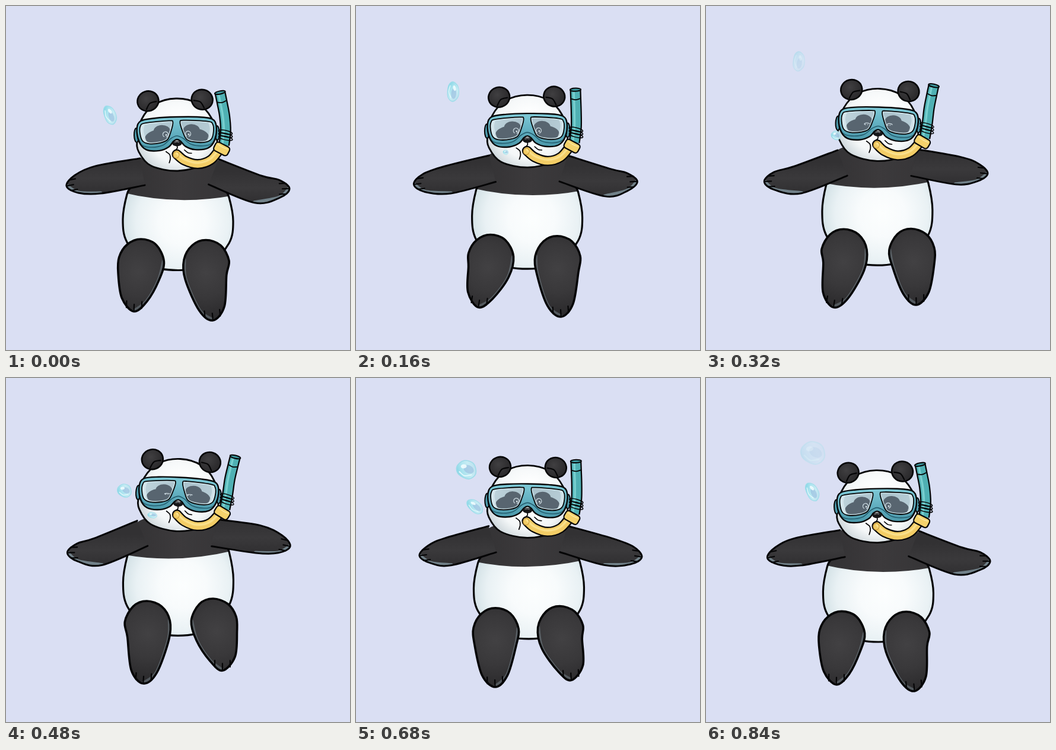
An HTML page with a canvas for the animation above (0.88 s loop, 580 px wide and 580 px high).

```html
<!DOCTYPE html>
<html lang="en">
<head>
<meta charset="utf-8">
<title>Snorkelling panda</title>
<style>
html, body { margin: 0; width: 100%; height: 100%; overflow: hidden; background: #dadff3; }
canvas { display: block; }
</style>
</head>
<body>
<canvas id="stage" width="580" height="580"></canvas>
<script>
const ctx = document.getElementById('stage').getContext('2d');
const LOOP = 880, STEP = 40;
const INK = '#050506';

const mix = (a, b, k) => a + (b - a) * k;
const clamp = (v, low, high) => Math.max(low, Math.min(high, v));

// Every part of the body swings once per loop around its rest value.
let phase = 0;
const swing = (rest, cos, sin = 0) => rest + cos * Math.cos(phase) + sin * Math.sin(phase);

// Smooth curve through [x, y] points.
function spline(pts, closed) {
  const n = pts.length, path = new Path2D();
  const at = i => pts[closed ? (i + n) % n : clamp(i, 0, n - 1)];
  path.moveTo(...pts[0]);
  for (let i = 0; i < (closed ? n : n - 1); i++) {
    const [a, b, c, d] = [at(i - 1), at(i), at(i + 1), at(i + 2)];
    path.bezierCurveTo(
      b[0] + (c[0] - a[0]) / 6, b[1] + (c[1] - a[1]) / 6,
      c[0] - (d[0] - b[0]) / 6, c[1] - (d[1] - b[1]) / 6, c[0], c[1]);
  }
  if (closed) path.closePath();
  return path;
}

const flip = pts => pts.map(([x, y]) => [-x, y]);
const mirrored = half => spline([...half, ...flip(half).reverse().filter(p => p[0])], true);

function oval(x, y, rx, ry, tilt = 0) {
  const path = new Path2D();
  path.ellipse(x, y, rx, ry, tilt, 0, 7);
  return path;
}

function stroke(path, width, color = INK) {
  ctx.lineWidth = width;
  ctx.strokeStyle = color;
  ctx.stroke(path);
}

function fill(path, style) {
  ctx.fillStyle = style;
  ctx.fill(path);
}

function shape(path, style, width) {
  fill(path, style);
  stroke(path, width);
}

function inside(path, draw) {
  ctx.save();
  ctx.clip(path);
  draw();
  ctx.restore();
}

function placed(x, y, angle, draw) {
  ctx.save();
  ctx.translate(x, y);
  ctx.rotate(angle);
  draw();
  ctx.restore();
}

function addStops(gradient, colors) {
  colors.forEach((c, i) => gradient.addColorStop(i / (colors.length - 1), c));
  return gradient;
}
const radial = (x, y, r, ...colors) => addStops(ctx.createRadialGradient(x, y, 0, x, y, r), colors);
const linear = (x0, y0, x1, y1, ...colors) => addStops(ctx.createLinearGradient(x0, y0, x1, y1), colors);

// Unit vector across the line from a to b.
function across(a, b) {
  const dx = b[0] - a[0], dy = b[1] - a[1], d = Math.hypot(dx, dy);
  return [dy / d, -dx / d];
}

// Limb around joints [x, y, half width] ending in a paw; a top point closes the outline.
function drawLimb({ joints, tip, top, side, fur, rim, width }) {
  const edge = sign => joints.map(([x, y, w], i) => {
    const [nx, ny] = across(joints[i - 1] || joints[i], joints[i + 1] || tip);
    return [x + sign * nx * w, y + sign * ny * w];
  });
  const outline = [...edge(1), tip, ...edge(-1).reverse()];
  if (top) outline.push(top);
  const limb = spline(outline, Boolean(top));
  fill(limb, fur);
  inside(limb, () => stroke(spline([...edge(side).slice(1), tip]), 7, rim));
  stroke(limb, width);

  const last = joints[joints.length - 1], [nx, ny] = across(last, tip);
  for (const o of [-0.6, 0, 0.6]) {
    const depth = 1 + 14 * o * o, w = o * last[2];
    const claw = d => [tip[0] + nx * w + ny * d, tip[1] + ny * w - nx * d];
    stroke(spline([claw(depth), claw(depth + 11)]), 2.2);
  }
}

function drawArm(side, shoulder, elbow, tip) {
  const k = 17 / Math.hypot(tip[0] - elbow[0], tip[1] - elbow[1]);
  const wrist = [mix(tip[0], elbow[0], k), mix(tip[1], elbow[1], k), 15];
  drawLimb({
    joints: [[...shoulder, 23], [...elbow, 23.5], wrist], tip, side, width: 3,
    fur: linear(0, elbow[1] - 30, 0, elbow[1] + 25, '#323133', '#3a393b', '#2f2e30'),
    rim: '#718189'
  });
}

function drawLeg(side, topY, hipX, kneeX, ankleX, tip) {
  drawLimb({
    joints: [[hipX, topY + 9, 24], [hipX, topY + 34, 38], [kneeX, topY + 63, 35], [ankleX, tip[1] - 20, 21.5]],
    tip, top: [hipX - 1, topY], side, width: 3.6,
    fur: radial(kneeX, topY + 55, 82, '#424143', '#39383a', '#29282a'),
    rim: 'rgba(120,134,142,0.5)'
  });
}

function drawTorso() {
  const cx = swing(290, 0, -1.5), bottom = swing(440, 5.5, 1);
  const left = swing(308.5, 9, -2.5), right = swing(308, 14.5);
  const flank = [[-78, -0.11], [-86, 0], [-93, 0.33], [-86, 0.63], [-52, 0.92]];
  const place = edge => ([x, k]) => [cx + x, mix(edge, bottom, k)];
  const side = [...flank.map(place(left)), [cx, bottom], ...flip(flank).reverse().map(place(right))];
  const body = spline([...side, [350, left - 62], [230, left - 62]], true);
  fill(body, radial(cx + 8, mix(left, bottom, 0.36), 118, '#fcfefe', '#f8fbfc', '#e9f1f4', '#c6d8de'));
  inside(body, () => {
    const chest = new Path2D();
    chest.moveTo(cx - 93, left - 3);
    chest.quadraticCurveTo(288, (left + right) / 2 + 17, cx + 93, right - 3);
    chest.lineTo(cx + 93, left - 90);
    chest.lineTo(cx - 93, left - 90);
    fill(chest, linear(200, 0, 384, 0, '#323133', '#3c3a3c', '#353436'));
  });
  stroke(spline(side), 3.2);
}

function drawEar(x, y, side) {
  const ear = oval(x, y, 18, 16.8, side * 0.3);
  shape(ear, radial(x - 3, y - 4, 20, '#403f41', '#2b2a2c'), 2.6);
  stroke(spline([[x + side * 3, y + 14], [x - side * 3, y + 4], [x - side * 14, y + 1]]), 2.2);
}

function drawLens(side, open) {
  const half = [[6, -21], [13, -24], [53, -21], [61, -16], [62, -4], [58, 9], [47, 14], [28, 13], [16, 8], [10, -5]];
  const lens = spline(side < 0 ? flip(half) : half, true);
  fill(lens, linear(-60, -20, 60, 15, '#c0d5dd', '#a9c0ca', '#b8ced7'));
  inside(lens, () => {
    fill(oval(side * 32, 2, 22, 11.5, side * 0.15), '#586570');
    fill(oval(side * 25, -7, 14, 10), '#586570');
    stroke(spline([[side * 55, -24], [side * 59, -8], [side * 53, 14]]), 6, 'rgba(236,248,251,0.5)');
    stroke(lens, 5, 'rgba(216,240,246,0.7)');
    const eye = new Path2D();
    eye.ellipse(side * 19, -1, 4.5, 4.5 * open, 0, 2.2, 2.2 + Math.PI * (1 + 0.7 * open));
    stroke(eye, 1.4, '#c4d2d9');
    fill(oval(side * 19 + 1, 0, 1.4, 1.4 * open), '#dbe6ea');
  });
  stroke(lens, 1.8);
}

function drawGoggles(open) {
  for (const side of [-1, 1]) shape(oval(side * 68, -1, 4, 12), '#4c98a9', 2);
  const frame = mirrored([
    [0, -30], [35, -29], [60, -25], [67, -12], [64, 10], [52, 24], [30, 26], [14, 20], [6, 11], [0, 8]
  ]);
  fill(frame, linear(0, -30, 0, 27, '#7fcad7', '#62afc0', '#4a97a9'));
  const rim = [[65, 4], [59, 16], [44, 20], [24, 17], [10, 6]];
  stroke(spline([...flip(rim), [0, 2], ...rim.reverse()]), 1.6, '#255f70');
  stroke(frame, 2.4);
  drawLens(-1, open);
  drawLens(1, open);
}

// Hose with a dark edge and a lighter streak along it.
function drawHose(pts, width, color, shine, dx, dy) {
  const hose = spline(pts);
  stroke(hose, width);
  stroke(hose, width - 4.5, color);
  placed(dx, dy, 0, () => stroke(hose, 3.5, shine));
}

function drawSnorkel(tip) {
  const bend = k => mix(83, tip, k);
  ctx.lineCap = 'butt';
  drawHose([[79, 20], [82.5, -5], [bend(0.2), -30], [bend(0.62), -52], [tip, -70]], 19, '#4fb0b3', '#78cfcf', -3, 0);
  ctx.lineCap = 'round';
  const lean = Math.atan2(tip - bend(0.62), 18);
  shape(oval(tip, -69, 9, 2.6, lean), '#3c969c', 2);
  placed(bend(0.66), -54, lean, () => stroke(spline([[-8, 0], [0, 2], [8, 0]]), 1.8));
  for (const y of [-2, 3, 8]) stroke(oval(82, y, 12, 3, 0.25), 1.4);

  drawHose([[-1, 33], [12, 44], [34, 50.5], [56, 44], [72, 26]], 17, '#f3cd66', '#fae08b', 0, -2);
  stroke(oval(-2, 34, 5, 5.5), 1.2, '#c99b3c');
  placed(75, 26, 0.5, () => {
    const band = new Path2D();
    band.roundRect(-13, -8, 26, 16, 5);
    shape(band, '#f5d26c', 2.2);
    stroke(spline([[-9, -4], [0, -3], [9, -4]]), 1.4, '#fceaa8');
  });
}

function drawHead(t) {
  const open = clamp((Math.abs(t - 410) - 60) / 80, 0.2, 1);
  const tilt = swing(0.6, -2.2, -0.4) * Math.PI / 180;
  placed(swing(289.5, -1.5), swing(207, 10), tilt, () => {
    const skull = mirrored([[0, -61], [36, -52], [59, -27], [67, 6], [65, 27], [45, 51], [0, 61]]);
    shape(skull, radial(4, -8, 82, '#ffffff', '#fdfefe', '#f4f7f8', '#c6d0d5'), 2.8);
    drawEar(-47, -58, -1);
    drawEar(swing(47.3, -3), -58, 1);
    drawGoggles(open);
    fill(oval(0, 15, 8, 4.5), '#161618');
    stroke(spline([[-4, 13], [0, 12], [3, 13]]), 1.5, '#77777a');
    stroke(spline([[0, 19], [0, 23], [-4, 27]]), 1.8);
    stroke(spline([[-19, 28], [-13, 33], [-12, 40], [-14, 47]]), 1.8);
    stroke(spline([[12, 26], [18, 31], [24, 32]]), 1.6);
    drawSnorkel(swing(84, -9.3, 2));
  });
}

// Both bubbles slip out of the mouth, slow down sideways and rise until they fade.
const BUBBLES = [
  {
    born: 140, life: 720, x: age => 172 + 86 * Math.exp(-age / 300), y: age => 250 - 0.177 * age,
    size: age => 4 + 0.024 * age, squash: 0.92, tilt: () => 0.3
  },
  {
    born: 420, life: 820, x: age => 145 + 122 * Math.exp(-age / 330), y: age => 232 - 0.000228 * age * age,
    size: age => 16.5 * (1 - Math.exp(-age / 90)), squash: 0.62, tilt: age => Math.min(1.6, age / 400)
  }
];

function drawBubble(bubble, t) {
  const age = (t - bubble.born + LOOP) % LOOP, left = 1 - age / bubble.life;
  if (left <= 0) return;
  const size = bubble.size(age);
  placed(bubble.x(age), bubble.y(age), bubble.tilt(age), () => {
    ctx.globalAlpha = 0.92 * Math.min(1, left * 3.3 + 0.2);
    ctx.scale(size, size * bubble.squash);
    const drop = spline([[-1, 0], [-0.5, -0.85], [0.5, -0.85], [1, 0.1], [0.5, 0.9], [-0.6, 0.75]], true);
    fill(drop, linear(-1, 0.8, 1, -0.6, '#6fcfe0', '#a5e3ee', '#c5edf4', '#b6dcec'));
    stroke(drop, 0.1, '#9cdce9');
    fill(oval(0.2, -0.1, 0.55, 0.42, 0.3), 'rgba(151,187,221,0.65)');
    fill(oval(-0.35, -0.25, 0.3, 0.22, -0.5), 'rgba(245,254,255,0.9)');
    stroke(spline([[-0.6, 0.45], [0, 0.7], [0.6, 0.4]]), 0.13, '#e6fafc');
  });
}

function draw(t) {
  phase = 2 * Math.PI * t / LOOP;
  ctx.fillStyle = '#dadff3';
  ctx.fillRect(0, 0, 580, 580);
  ctx.lineCap = ctx.lineJoin = 'round';

  drawTorso();
  drawArm(1, [230, swing(270.5, 9)], [155, 293], [swing(102, 0, -5), swing(299, 4.5)]);
  drawArm(-1, [350, swing(270, 9.5)], [425, swing(290, 19)], [swing(478, 0, -4), swing(295, 13, -5)]);
  drawLeg(1, swing(384, 9, -2.5), swing(233, -4.5, -3.8), swing(231, -7.5, -5),
    swing(223, -6.5, -12), [swing(221.5, -6, -14), swing(514, 1, -7)]);
  drawLeg(-1, swing(383, 11.5), swing(344, -6, -1.5), swing(346, -9, -2.5),
    swing(355, -8, -8), [swing(356, -7, -8), swing(512, 18, 5)]);
  drawHead(t);
  for (const bubble of BUBBLES) drawBubble(bubble, t);
}

const start = performance.now();
function tick() {
  const elapsed = Math.max(0, performance.now() - start) % LOOP;
  draw(Math.floor(elapsed / STEP) * STEP);
  requestAnimationFrame(tick);
}
tick();
</script>
</body>
</html>
```
